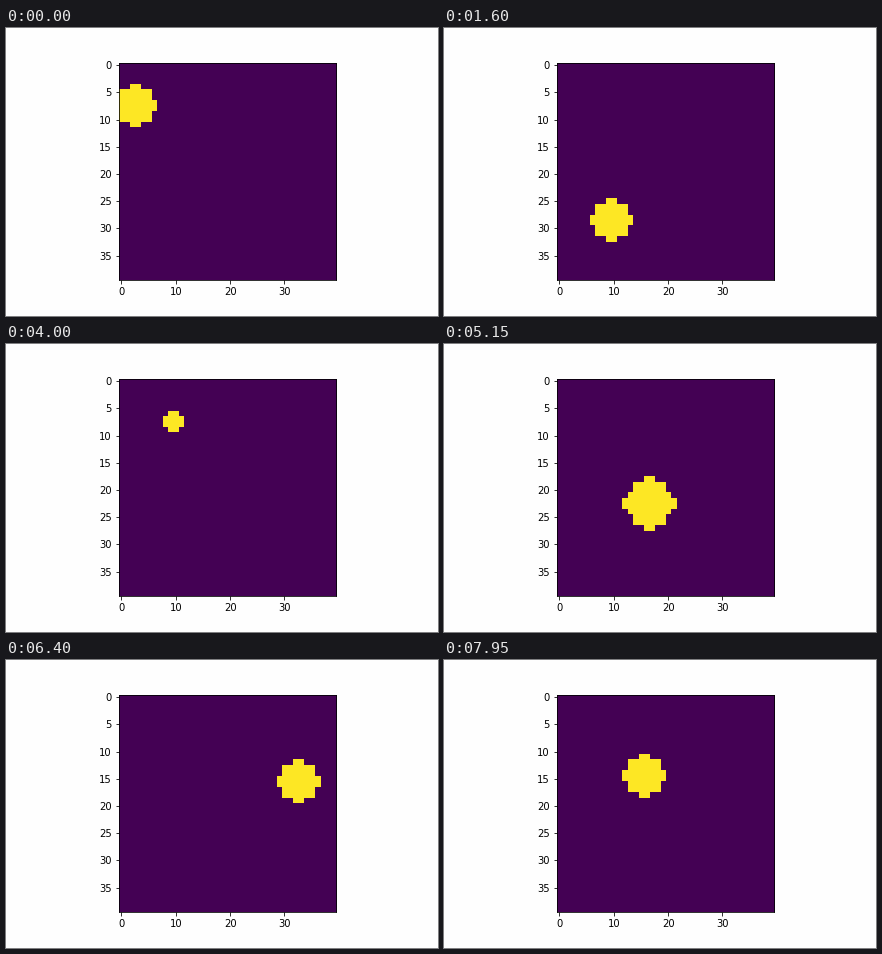
A matplotlib script for the animation above (8 s loop, 432 by 288 pixels).

```python
import numpy as np
import matplotlib.pyplot as plt
from matplotlib.animation import FuncAnimation

N = 40        # cells per side
STEPS = 16    # frames per scene

STILL = np.array([0, 0])
DOWN = np.array([0, 1])
UP = -DOWN
DIAGONAL = np.array([1, 1])


def bounce(start, shift, radius):
    """Fold a straight path back at the walls."""
    low = min(start, radius)
    span = N - radius - low
    return low + span - abs(span - (start - low + shift) % (2 * span))


def half_width(k, radius):
    """Cells to each side in the ball's k-th row from the middle."""
    if k == radius - 1:
        return 1
    return min(radius, max(3, radius - k))


def draw_ball(x, y, radius):
    grid = np.zeros((N, N))
    for k in range(radius):
        half = half_width(k, radius)
        for row in (y + k, y - k - 1):
            if 0 <= row < N:
                grid[row, max(x - half, 0):x + half] = 1
    return grid


def scene(x, y, move, radius=4):
    """One ball setting out from a point, as a picture per step."""
    for step in range(STEPS):
        dx, dy = move * step
        yield draw_ball(bounce(x, dx, radius), bounce(y, dy, radius), radius)


pictures = [
    *scene(3, 8, 2 * DIAGONAL),
    *scene(28, 17, DIAGONAL, radius=5),
    *scene(10, 29, STILL),
    *scene(10, 21, UP),
    *scene(16, 15, DOWN),
    *scene(10, 8, STILL, radius=2),
    *scene(3, 9, 2 * DIAGONAL, radius=5),
    *scene(15, 7, UP),
    *scene(33, 16, DIAGONAL),
    *scene(16, 8, UP),
]

fig, ax = plt.subplots(figsize=(6, 4), dpi=72, facecolor="#fefefe")
fig.subplots_adjust(left=0.125, right=0.9, bottom=0.125, top=0.88)
image = ax.imshow(pictures[0], cmap="viridis", vmin=0, vmax=1,
                  interpolation="nearest")
ax.set_xticks(range(0, N, 10))
ax.set_yticks(range(0, N, 5))
ax.tick_params(labelsize=10, labelfontfamily="DejaVu Sans")


def update(i):
    image.set_data(pictures[i])
    return [image]


anim = FuncAnimation(fig, update, frames=len(pictures), interval=50,
                     repeat=True, repeat_delay=0)
plt.show()
```
